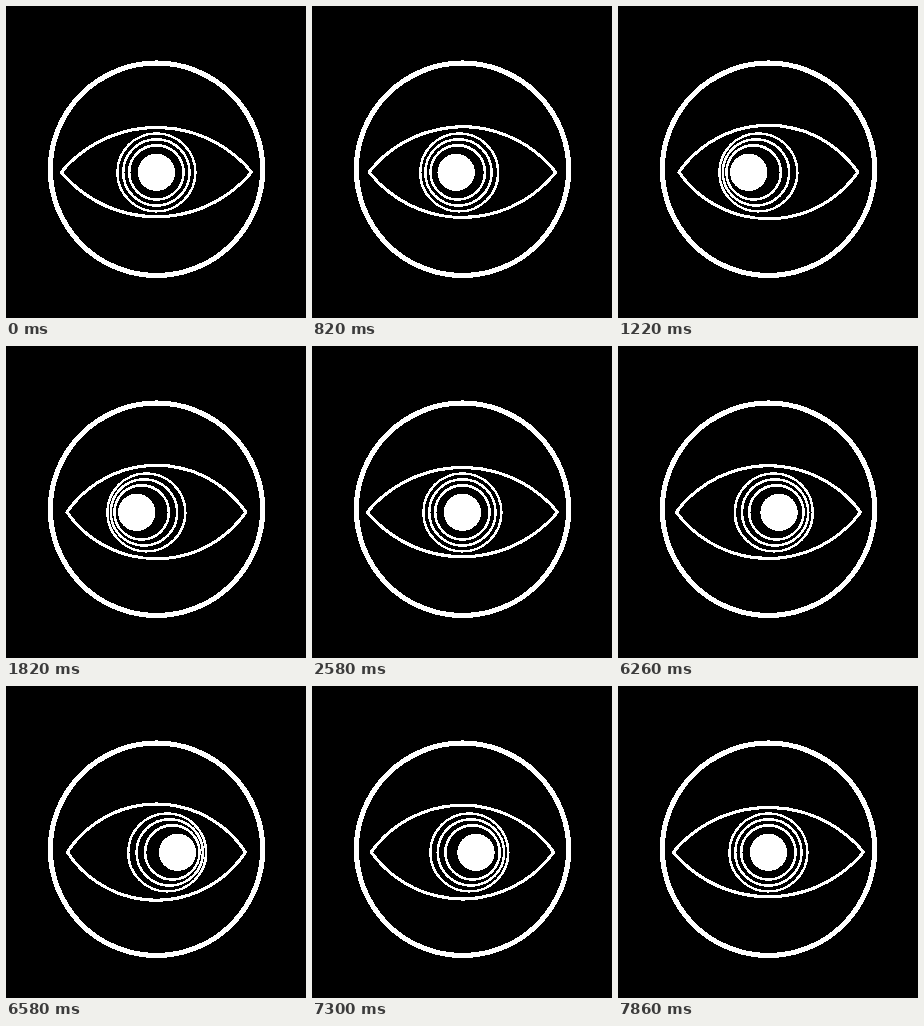
An HTML page with a canvas that plays this animation: 300 by 312 pixels, repeating every 8000 ms.

```html
<!DOCTYPE html>
<html lang="en">
<head>
<meta charset="utf-8">
<title>Looking eye</title>
<style>
html, body { margin: 0; width: 100%; height: 100%; overflow: hidden; background: #000; }
canvas { display: block; }
</style>
</head>
<body>
<canvas id="stage" width="300" height="312"></canvas>
<script>
const ctx = document.getElementById('stage').getContext('2d', { willReadFrequently: true });
const W = 300, H = 312;
const LOOP = 8000, STEP = 40;
const CX = 150.4, CY = 166.4, LID_Y = 166.1;
const REACH = 24.2;

// radius and share of the gaze shift for each iris ring
const RINGS = [[39, 0.51], [33.2, 0.63], [27.2, 0.75]];

// 0 at both ends, 1 halfway, eased like a cosine
function glance(t, start, end) {
  if (t <= start || t >= end) return 0;
  return (1 - Math.cos(2 * Math.PI * (t - start) / (end - start))) / 2;
}

function circle(x, y, r, width) {
  ctx.beginPath();
  ctx.arc(x, y, r, 0, 2 * Math.PI);
  if (width) {
    ctx.lineWidth = width;
    ctx.stroke();
  } else {
    ctx.fill();
  }
}

// two arcs meeting in the corners
function lids(halfWidth, height) {
  const r = (halfWidth ** 2 + height ** 2) / (2 * height);
  const a = Math.asin(halfWidth / r);
  const up = -Math.PI / 2, down = Math.PI / 2;
  ctx.beginPath();
  ctx.arc(CX, LID_Y - height + r, r, up - a, up + a);
  ctx.arc(CX, LID_Y + height - r, r, down - a, down + a);
  ctx.closePath();
  ctx.lineWidth = 3;
  ctx.lineJoin = 'round';
  ctx.stroke();
}

// hard black and white edges, without smoothing
function sharpen() {
  const image = ctx.getImageData(0, 0, W, H);
  const px = image.data;
  for (let i = 0; i < px.length; i += 4) {
    px[i] = px[i + 1] = px[i + 2] = px[i] > 110 ? 255 : 0;
  }
  ctx.putImageData(image, 0, 0);
}

function draw(time) {
  const t = Math.floor((time % LOOP + 20) / STEP) * STEP - 20;
  const left = glance(t, 460, 2580);
  const right = glance(t, 5780, 7860);
  const shift = REACH * (right - left);

  ctx.fillStyle = '#000';
  ctx.fillRect(0, 0, W, H);
  ctx.fillStyle = ctx.strokeStyle = '#fff';

  circle(150.5, 163.3, 106.2, 5);
  lids(95.2 - 7 * (left + right), 44.6 + 2.6 * left + 4 * right);
  for (const [r, share] of RINGS) circle(CX + shift * share, CY, r, 2.4);
  circle(CX + shift, CY, 18.6);
  sharpen();
}

function tick() {
  draw(performance.now());
  requestAnimationFrame(tick);
}
tick();
</script>
</body>
</html>
```
